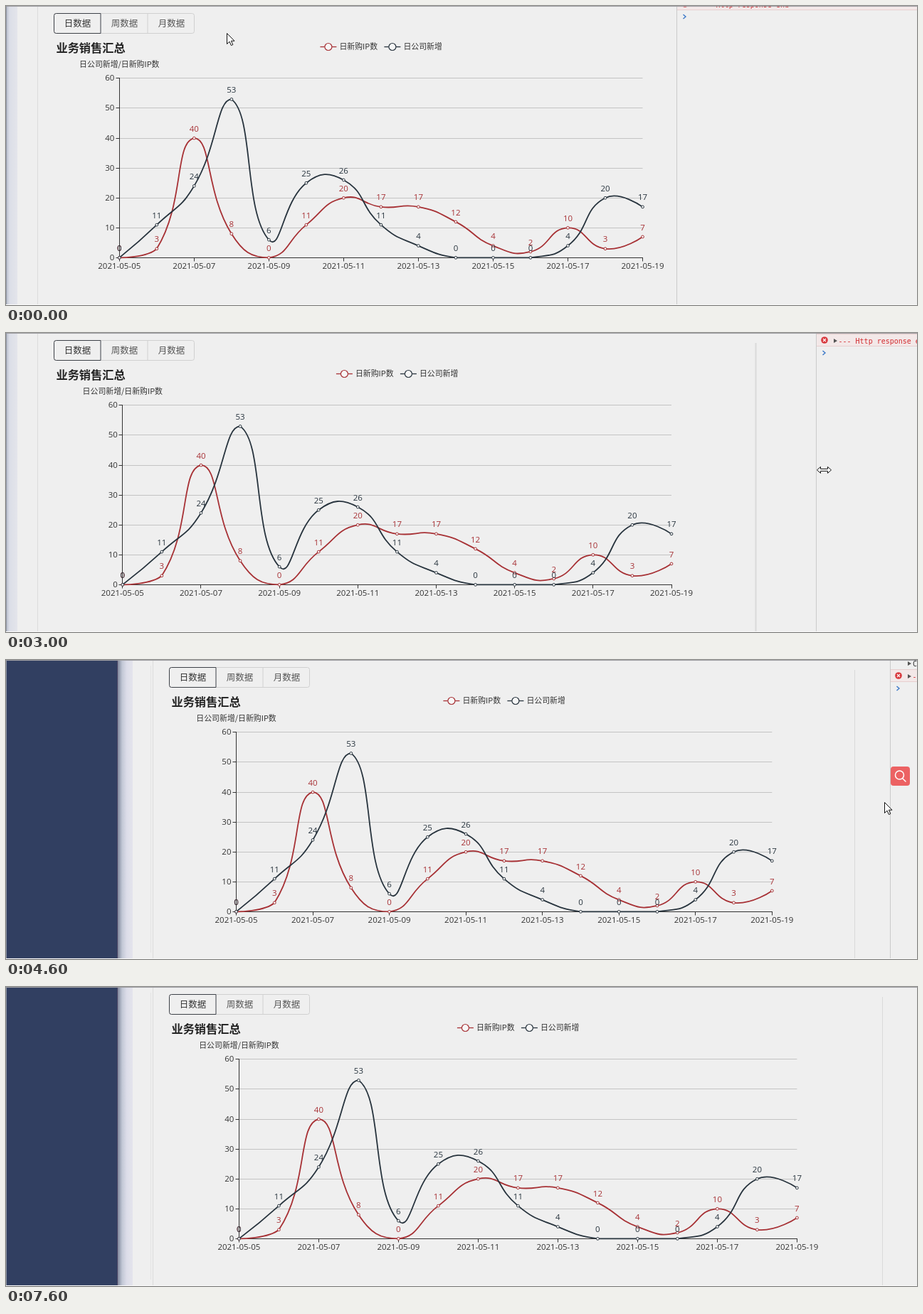
Recreate the animation shown at these times as an HTML page. Size 1280 by 421 pixels, loop 7.8 s.

```html
<!DOCTYPE html>
<html lang="zh-CN">
<head>
<meta charset="utf-8">
<title>业务销售汇总</title>
<style>
  html, body { margin: 0; width: 100%; height: 100%; overflow: hidden; background: #efefef; }
  svg { display: block; width: 1280px; height: 421px; }
  text { font-family: "Open Sans", "Noto Sans CJK SC", "Noto Sans CJK", sans-serif; font-size: 11.5px; white-space: pre; }
  .cjk { font-family: "Noto Sans CJK SC", "Noto Sans CJK", sans-serif; font-size: 10.9px; }
  .tab { font-size: 12.5px; }
  .title { font-size: 16.2px; font-weight: bold; }
  .mono { font-family: "DejaVu Sans Mono", monospace; font-size: 10px; }
</style>
</head>
<body>
<svg id="stage" viewBox="0 0 1280 421">
  <defs>
    <linearGradient id="shade">
      <stop offset="0" stop-color="#7f889c"/>
      <stop offset=".3" stop-color="#c3c8d6"/>
      <stop offset=".6" stop-color="#dcdde9"/>
      <stop offset="1" stop-color="#e4e4ec"/>
    </linearGradient>
    <linearGradient id="strip">
      <stop offset="0" stop-color="#b4bac8"/>
      <stop offset=".3" stop-color="#dbdee7"/>
      <stop offset="1" stop-color="#e4e5eb"/>
    </linearGradient>
  </defs>
  <g id="scene"></g>
</svg>
<script>
const LOOP = 7800, STEP = 200;
const RED = '#a73135', DARK = '#28343e', INK = '#333';
const reds = [0, 3, 40, 8, 0, 11, 20, 17, 17, 12, 4, 2, 10, 3, 7];
const darks = [0, 11, 24, 53, 6, 25, 26, 11, 4, 0, 0, 0, 4, 20, 17];

// Keyed tracks: [ms, value...]
const dividerKeys = [[1400, 942], [2200, 1103], [2800, 1103], [3600, 1242], [5000, 1242], [5600, 1281]];
const gridKeys = [[2200, 919], [2400, 922], [2800, 964], [3800, 964], [4200, 941], [5400, 941], [5600, 944], [5800, 944], [6000, 980]];
const pointerKeys = [
  [0, 310, 38], [200, 156, 210], [400, 480, 340], [600, 800, 260], [800, 955, 160], [1000, 955, 160],
  [1200, 953, 163], [1400, 953, 163], [2200, 1113, 185], [2400, 1117, 185], [2800, 1108, 192],
  [3800, 1253, 194], [4200, 1253, 194], [4600, 1234, 200], [5000, 1240, 197], [5600, 1279, 193]
];
const canvasSteps = [[0, 919], [2400, 964], [4000, 941], [5600, 980]];
const logSteps = [[0, -13], [1800, 0], [3400, 12]];

const within = (t, a, b) => t >= a && t < b;
const held = (steps, t) => steps.filter(s => s[0] <= t).pop()[1];

function track(keys, t) {
  const i = keys.findIndex(k => k[0] > t);
  if (i < 0) return keys[keys.length - 1].slice(1);
  if (i === 0) return keys[0].slice(1);
  const a = keys[i - 1], b = keys[i], f = (t - a[0]) / (b[0] - a[0]);
  return a.slice(1).map((v, j) => v + (b[j + 1] - v) * f);
}

const line = (x1, y1, x2, y2, color, w = 1) =>
  `<path d="M${x1} ${y1}L${x2} ${y2}" stroke="${color}" stroke-width="${w}"/>`;
const rect = (x, y, w, h, fill) => `<rect x="${x}" y="${y}" width="${w}" height="${h}" fill="${fill}"/>`;
const text = (s, x, y, fill = INK, anchor = 'start', cls = '') =>
  `<text x="${x}" y="${y}" fill="${fill}" text-anchor="${anchor}" class="${cls}">${s}</text>`;
const ring = (x, y, r, color, w) =>
  `<circle cx="${x}" cy="${y}" r="${r}" fill="#f7f7f7" stroke="${color}" stroke-width="${w}"/>`;
const crisp = v => Math.floor(v) + 0.5;
const level = v => 354.4 - v * 4.208;

// Smooth curve whose control points stay inside the data's bounds.
function curve(pts) {
  const ys = pts.map(p => p[1]), top = Math.min(...ys), low = Math.max(...ys);
  const clamp = p => [p[0], Math.min(low, Math.max(top, p[1]))];
  const dist = (a, b) => Math.hypot(a[0] - b[0], a[1] - b[1]);
  let d = `M${pts[0]}`, from = pts[0];
  for (let i = 1; i < pts.length; i++) {
    const p = pts[i], prev = pts[i - 1], next = pts[i + 1];
    let to = p, out = p;
    if (next) {
      const ratio = dist(p, next) / (dist(p, next) + dist(p, prev));
      const shift = k => [p[0] + (next[0] - prev[0]) * k, p[1] + (next[1] - prev[1]) * k];
      to = shift(-0.5 * (1 - ratio));
      out = shift(0.5 * ratio);
    }
    d += `C${clamp(from)} ${clamp(to)} ${p}`;
    from = out;
  }
  return d;
}

function series(data, left, width, color) {
  const pts = data.map((v, i) => [left + width * i / (data.length - 1), level(v)]);
  return `<path d="${curve(pts)}" fill="none" stroke="${color}" stroke-width="1.8"/>` +
    pts.map((p, i) => ring(p[0], p[1], 1.9, color, 1) +
      text(data[i], p[0], p[1] - 9.4, color, 'middle')).join('');
}

function chart(x0, grid) {
  const left = x0 + grid * 0.1, width = grid * 0.8, right = left + width, axis = crisp(left);
  let s = text('日公司新增/日新购IP数', left, 85.5, INK, 'middle', 'cjk');
  for (let v = 0; v <= 60; v += 10) {
    const y = crisp(level(v));
    if (v) s += line(left, y, right, y, '#c3c3c3');
    s += line(axis - 5, y, axis, y, INK) + text(v, left - 7, y + 3.5, INK, 'end');
  }
  s += line(axis, 101, axis, 355, INK) + line(axis, 354.5, right, 354.5, INK);
  for (let i = 0; i < 15; i += 2) {
    const x = left + width * i / 14;
    s += line(crisp(x), 354, crisp(x), 359.5, INK) +
      text('2021-05-' + String(5 + i).padStart(2, '0'), x, 370, INK, 'middle');
  }
  return s + series(reds, left, width, RED) + series(darks, left, width, DARK);
}

function legend(mid) {
  const item = (x, name, color) => line(x, 57.5, x + 23, 57.5, color, 1.3) +
    ring(x + 11.5, 57.5, 5, color, 1.2) + text(name, x + 27, 61, INK, 'start', 'cjk');
  return item(mid - 85.5, '日新购IP数', RED) + item(mid + 4.5, '日公司新增', DARK);
}

function tabs(x) {
  const names = ['日数据', '周数据', '月数据'];
  return `<rect x="${x + 0.5}" y="10.5" width="197" height="28" rx="3" fill="none" stroke="#d0d0d0"/>` +
    line(x + 132, 11, x + 132, 38, '#d0d0d0') +
    `<path d="M${x + 66} 10.5H${x + 3.5}q-3 0-3 3v22q0 3 3 3H${x + 66}z" fill="none" stroke="#3d4148"/>` +
    names.map((n, i) => text(n, x + 33.5 + 66 * i, 29, i ? '#555' : INK, 'middle', 'cjk tab')).join('');
}

function page(t) {
  const shift = t >= 3600 ? 162 : 0, width = held(canvasSteps, t);
  const card = 44 + shift, x0 = card + 23, edge = card + width + 46;
  let s = '';
  if (t >= 4000) {
    s += rect(0, 0, 157, 421, '#313f61') + rect(156, 0, 1.5, 421, '#4b4463') + rect(157, 0, 21, 421, 'url(#shade)');
  } else {
    s += rect(0, 0, 16, 421, 'url(#strip)');
    if (shift) s += rect(17, 4, 187, 413, '#f1f1f1');
  }
  if (shift) s += line(203.5, 8, 203.5, 412, '#e3e3e3');
  s += line(card + 0.5, 1, card + 0.5, 420, '#dcdcdc') + line(edge - 0.5, 14, edge - 0.5, 420, '#dadada', shift ? 1 : 2);
  return s + tabs(x0) + text('业务销售汇总', x0 + 3.5, 65, '#222', 'start', 'cjk title') +
    legend(x0 + 0.4 + width / 2) + chart(x0 + 0.4, track(gridKeys, t)[0]);
}

function devtools(t, d) {
  const y = held(logSteps, t);
  const wedge = cy => `<path d="M${d + 25} ${cy - 3}l5 3l-5 3z" fill="#555"/>`;
  let s = rect(d, 0, 1280, 421, '#efefef') + rect(d, y + 1, 1280, 18, '#f3e8e8') +
    line(d, y + 1.5, 1280, y + 1.5, '#e8cfcf') + line(d, y + 18.5, 1280, y + 18.5, '#e8cfcf') +
    wedge(y - 7) + text('Connected', d + 32, y - 3.5, INK, 'start', 'mono') +
    `<circle cx="${d + 12}" cy="${y + 10}" r="4.8" fill="#d8373c"/>` +
    `<path d="M${d + 10} ${y + 8}l4 4m0-4l-4 4" stroke="#fff" stroke-width="1.2"/>` +
    wedge(y + 11) + text('--- Http response end ---', d + 31.5, y + 15, '#d22b2f', 'start', 'mono') +
    `<path d="M${d + 9.5} ${y + 25}l3.5 3l-3.5 3" fill="none" stroke="#3b78c8" stroke-width="1.4"/>`;
  if (within(t, 3600, 4000)) s += line(d + 22.5, y + 22, d + 22.5, y + 34, '#222');
  return s + line(d + 0.5, 0, d + 0.5, 421, '#cacaca');
}

const searchButton = () => `<rect x="1243" y="150" width="27" height="27" rx="4" fill="#ec6263"/>
  <g fill="none" stroke="#fff" stroke-width="1.5" stroke-linecap="round">
  <circle cx="1255.5" cy="162" r="6"/><path d="M1260 167l4 4"/></g>`;

function pointer(t, d) {
  if (t >= 7000) return '';
  const [x, y] = track(pointerKeys, t);
  const resizing = within(t, 1200, 2400) || within(t, 3000, 4200) || within(t, 5200, 5600);
  const shape = resizing
    ? `<path transform="translate(${d + 11.5} ${y + 0.5})" d="M-10 0l5-4.5v3H5v-3L10 0l-5 4.5v-3H-5v3z"`
    : `<path transform="translate(${x + 0.5} ${y + 0.5})" d="M0 0v15l3.5-3.4 2.4 5.4 2.4-1-2.4-5.3H10.5z"`;
  return shape + ' fill="#fff" stroke="#111"/>';
}

function scene(t) {
  const d = Math.round(track(dividerKeys, t)[0]);
  return rect(0, 0, 1280, 421, '#efefef') + page(t) + devtools(t, d) +
    line(0, 0.5, 1280, 0.5, '#a0a0a4') + line(0.5, 0, 0.5, 421, '#8f95a2') + line(0, 420.5, 1280, 420.5, '#fafafa') +
    (within(t, 4200, 5000) ? searchButton() : '') + pointer(t, d);
}

const root = document.getElementById('scene');
let shown = -1;
function tick() {
  const t = Math.floor(performance.now() % LOOP / STEP) * STEP;
  if (t !== shown) root.innerHTML = scene(shown = t);
  requestAnimationFrame(tick);
}
tick();
</script>
</body>
</html>
```
